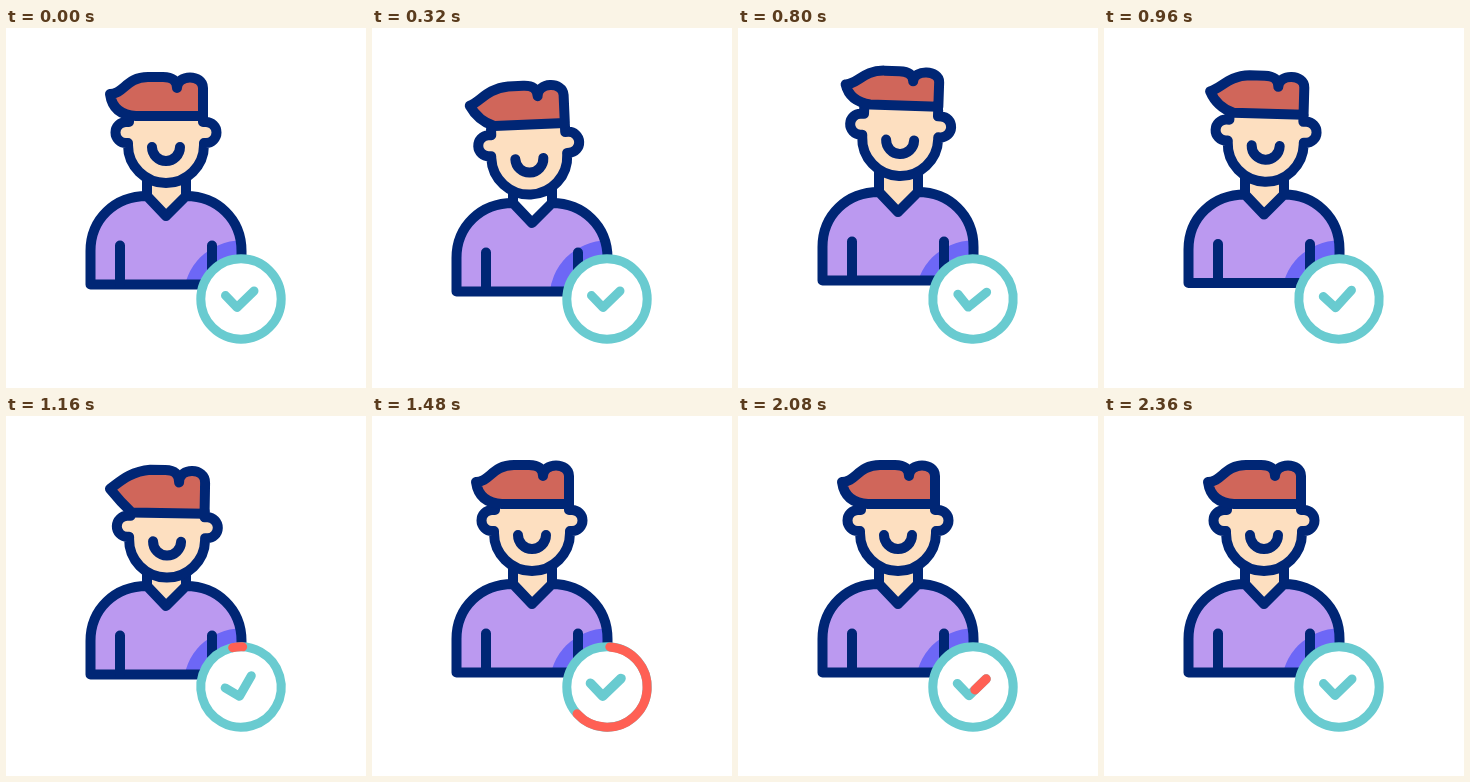
Recreate the animation shown at these times as an HTML page. Size 360 by 360 pixels, loop 2600 ms.

```html
<!DOCTYPE html>
<html lang="en">
<head>
<meta charset="utf-8">
<title>Verified user</title>
<style>
  html, body { margin: 0; width: 100%; height: 100%; overflow: hidden; background: #fff; }
  svg { display: block; width: 100%; height: 100%; }
  .line { fill: none; stroke: #002675; stroke-width: 10; }
  .teal { fill: none; stroke: #69cbd0; }
  .coral { fill: none; stroke: #ff6054; }
</style>
</head>
<body>
<svg viewBox="0 0 360 360" stroke-width="9" stroke-linecap="round" stroke-linejoin="round">
  <defs>
    <path id="torso" d="M84.500 256.500V223C84.500 191 109 168 141 168L160 188L180 168C211 168 235.500 191 235.500 223V256.500Z"/>
    <clipPath id="torsoClip"><use id="clipShape" href="#torso"/></clipPath>
  </defs>

  <g id="neck">
    <path id="neckSkin" fill="#fddfc0" d="M141 138V168L160 188L180 168V138Z"/>
    <path class="line" d="M141 146V168M180 146V168"/>
  </g>
  <use id="shirt" href="#torso" fill="#bb99f0"/>
  <circle cx="235" cy="270" r="57.500" fill="#6d67f6" clip-path="url(#torsoClip)"/>
  <g id="shirtLines" class="line">
    <use href="#torso"/>
    <path d="M114 217.500V256M206 217.500V256"/>
  </g>

  <g id="head" class="line">
    <path fill="#fddfc0" d="M123 88V94H120A10.500 10.500 0 0 0 120 115H122V117A38 38 0 0 0 198 117V115H200A10.500 10.500 0 0 0 200 94H197V88"/>
    <path d="M146 119A14 14 0 0 0 174 119"/>
    <path id="hair" fill="#d0665a"/>
  </g>

  <circle cx="235" cy="271" r="40" fill="#fff"/>
  <g id="badge">
    <circle class="teal" cx="235" cy="271" r="40.200"/>
    <circle id="ringSweep" class="coral" cx="235" cy="271" r="40.200" pathLength="100" transform="rotate(-86 235 271)"/>
    <g id="check">
      <path class="teal" d="M219.500 267.500L231 279.500L248 263"/>
      <path id="checkSweep" class="coral" pathLength="100" d="M219.500 267.500L231 279.500L248 263"/>
    </g>
  </g>
</svg>
<script>
const LOOP = 2600;
const $ = id => document.getElementById(id);

// time, body dy, head dy, head angle, hair dy, hair stretch, hair curl, badge angle, check scale
const poses = [
  [0, 0, 0, 0, 0, 1, 1, 0, 1],
  [320, 7, 11.5, -2.5, -3, 1, 0.4, 0, 1],
  [800, -4, -7, 2, -3.5, 0.88, 0.8, 5, 1],
  [1160, 2, 6.5, 1, 2.5, 1.1, 0, -16, 1],
  [1460, 0, 0, 0, 0, 1, 1, 0, 1.07],
  [1800, 0, 0, 0, 0, 1, 1, 0, 1.05],
  [2240, 0, 0, 0, 0, 1, 1, 0, 1],
  [LOOP, 0, 0, 0, 0, 1, 1, 0, 1]
];

const ease = p => (1 - Math.cos(Math.PI * Math.min(1, Math.max(0, p)))) / 2;
const progress = (t, from, to) => ease((t - from) / (to - from));

function poseAt(t) {
  const i = poses.findIndex(p => p[0] > t);
  const a = poses[i - 1], b = poses[i], k = progress(t, a[0], b[0]);
  return a.map((v, n) => v + (b[n] - v) * k).slice(1);
}

// Bottom edge stays at y = 88 while the top stretches
function hairPath(curl, stretch) {
  const mix = (straight, curled) => straight + (curled - straight) * curl;
  const y = v => 88 + (v - 88) * stretch;
  const tip = `${mix(102, 104)} ${y(mix(67, 66))}`;
  return `M${tip}C${mix(111, 118)} ${y(mix(61, 66))} ${mix(121, 120)} ${y(mix(51, 49))} 142 ${y(49)}` +
    `H157Q171 ${y(49)} 171 ${y(60)}C171 ${y(46)} 197 ${y(46)} 197 ${y(60)}V88H${mix(124, 130)}` +
    `Q${mix(113, 107)} ${y(mix(79, 87))} ${tip}Z`;
}

// Coral stretch between tail and head, both 0..1 of the path
function sweep(el, tail, head) {
  el.style.display = head - tail > 0.002 ? "" : "none";
  el.setAttribute("stroke-dasharray", `${(head - tail) * 100} 300`);
  el.setAttribute("stroke-dashoffset", -tail * 100);
}

function draw(t) {
  const [bodyY, headY, tilt, hairY, stretch, curl, spin, scale] = poseAt(t);
  const place = (id, value) => $(id).setAttribute("transform", value);

  for (const id of ["neck", "shirt", "shirtLines", "clipShape"]) place(id, `translate(0 ${bodyY})`);
  $("neckSkin").style.display = bodyY > 3 ? "none" : "";
  place("head", `translate(0 ${headY}) rotate(${tilt} 160 180)`);
  place("hair", `translate(0 ${hairY})`);
  $("hair").setAttribute("d", hairPath(curl, stretch));

  place("badge", `rotate(${spin} 235 271)`);
  place("check", `translate(234 271) scale(${scale}) translate(-234 -271)`);
  sweep($("ringSweep"), progress(t, 1480, 2040), progress(t, 1070, 1780));
  sweep($("checkSweep"), progress(t, 1840, 2260), progress(t, 1630, 2050));
}

function tick() {
  draw(performance.now() % LOOP);
  requestAnimationFrame(tick);
}
tick();
</script>
</body>
</html>
```
